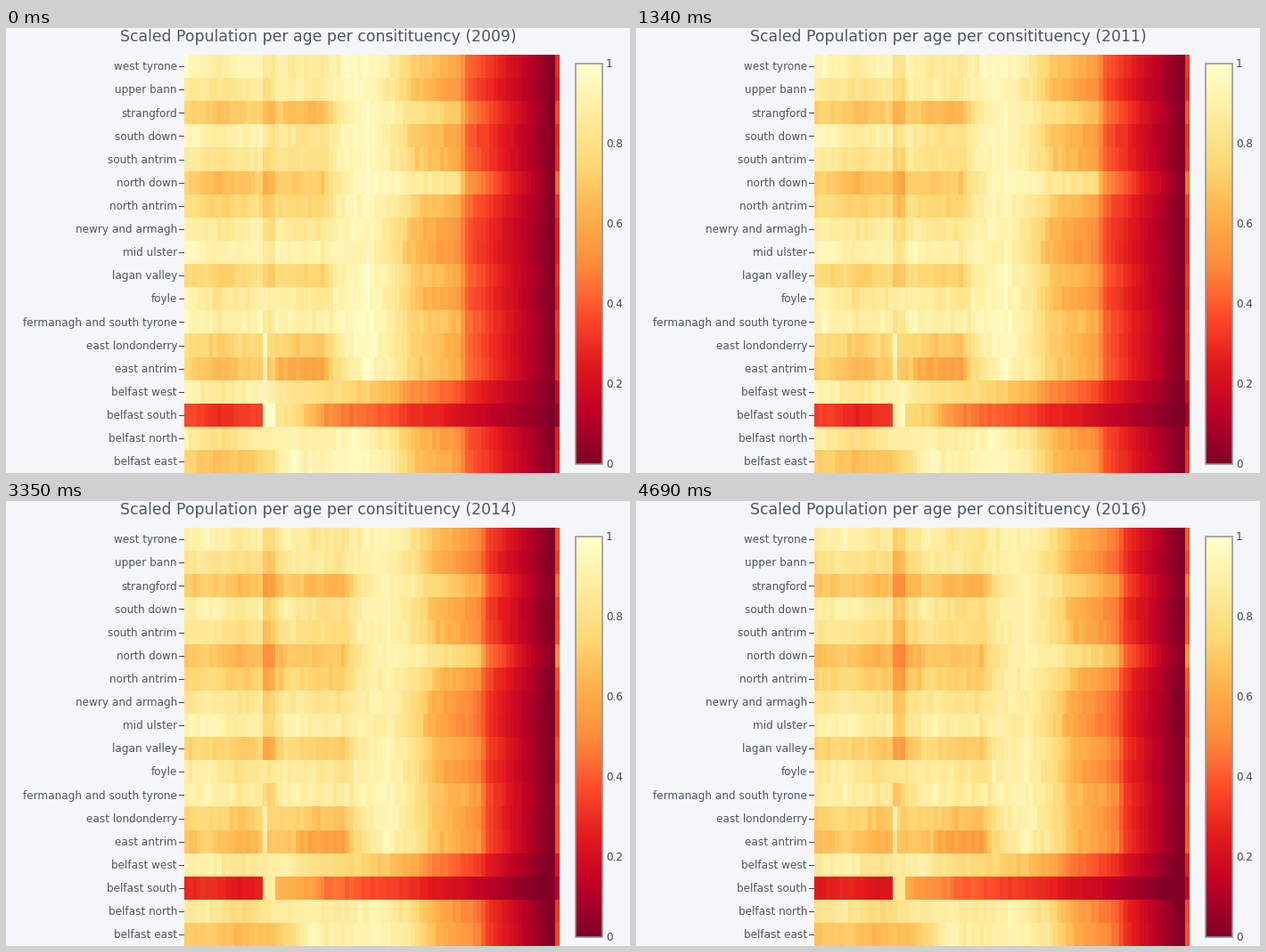
Write a matplotlib script that moves like this. It is 700x500 px and loops after 7370 ms.

```python
import numpy as np
import matplotlib.pyplot as plt
from matplotlib.animation import FuncAnimation
from matplotlib.patches import Rectangle

W, H, DPI = 700, 500, 100
PX = 72 / DPI                       # points per pixel
LEFT, RIGHT, TOP, BOTTOM = 200, 621, 30, 500.2
FIRST_YEAR, LAST_YEAR = 2009, 2016
AGES = np.arange(91)
BACK, INK, DARK = "#f5f6f9", "#4d5663", "#444444"

plt.rcParams["font.family"] = "DejaVu Sans"

# Typical level of the children, young adults and sixty-year-olds.
PLACES = {
    "west tyrone": (.91, .87, .66),
    "upper bann": (.83, .88, .60),
    "strangford": (.70, .66, .76),
    "south down": (.90, .83, .64),
    "south antrim": (.83, .80, .66),
    "north down": (.68, .72, .86),
    "north antrim": (.75, .75, .67),
    "newry and armagh": (.86, .86, .59),
    "mid ulster": (.91, .90, .58),
    "lagan valley": (.74, .74, .66),
    "foyle": (.87, .86, .61),
    "fermanagh and south tyrone": (.90, .91, .69),
    "east londonderry": (.74, .71, .66),
    "east antrim": (.68, .60, .67),
    "belfast west": (.88, .82, .45),
    "belfast south": (.32, .54, .27),
    "belfast north": (.83, .90, .59),
    "belfast east": (.69, .93, .63),
}
STUDENT_CITY = "belfast south"
STUDENT_TOWNS = {"east londonderry", "east antrim"}


def mix(a, b, share):
    return a + (b - a) * share


def cohort_size(age, child, adult, late):
    """Size of a generation by its age in the first year."""
    peak = min(.97, 1.6 * late)
    old = .62 * late + .03
    points = [
        (-7, child), (0, child + .05), (8, child - .03), (18, child + .04),
        (25, adult + .01), (33, adult - .02), (37, mix(adult, peak, .6)),
        (44, peak), (50, mix(peak, late, .3)), (55, mix(peak, late, .78)),
        (61, late), (66, late - .06), (68, old), (89, 0),
    ]
    return np.interp(age, *zip(*points))


def survival(age, years):
    """Share of those now at this age who lived through the last years."""
    def hazard(a):
        return .25 * np.exp(.1 * (a - 70))
    return np.exp(hazard(age - years) - hazard(age))


def student_effect(name, t):
    young = (AGES >= 19) & (AGES <= 21)
    if name == STUDENT_CITY:
        return np.where(young, .6, (AGES > 21) * .03 * np.clip(34 - AGES, 0, 12))
    if name in STUDENT_TOWNS:
        return .2 * (AGES == 19)
    if name == "foyle" or name.startswith("belfast"):
        return 0 * AGES
    moved_on = (AGES > 21) & (AGES - t < 19)
    return -.17 * (.5 + .07 * t) * young - .06 * moved_on


def row_values(index, name, t):
    cohort = AGES - t
    noise = np.random.default_rng(40 + index).normal(0, .022, 98)[cohort + 7]
    fade = 1 - t * (.035 if name == STUDENT_CITY else .005)
    size = cohort_size(cohort, *PLACES[name]) * (1 + noise) * fade
    floor = .12                     # smallest group, scaled to zero
    value = (size + floor) * survival(AGES, t) - floor + student_effect(name, t)
    late = PLACES[name][-1]
    value[89] = 0
    value[90] = .29 + .6 * (late - .65) + .014 * t
    return np.clip(value, 0, 1)


def heat(t):
    return np.array([row_values(i, name, t) for i, name in enumerate(PLACES)])


fig = plt.figure(figsize=(W / DPI, H / DPI), dpi=DPI, facecolor=BACK)
ax = fig.add_axes([0, 0, 1, 1])


def label(x, y, text, size=12, color=INK, ha="left"):
    return ax.text(x, y, text, fontsize=size * PX, color=color, ha=ha,
                   va="baseline")


def show_heat(data, left, right, bottom, top):
    return ax.imshow(data, cmap="YlOrRd_r", vmin=0, vmax=1, aspect="auto",
                     interpolation="nearest", extent=[left, right, bottom, top])


image = show_heat(heat(0), LEFT, RIGHT, BOTTOM, TOP)
title = label(350, 15, "", size=17.25, ha="center")

row_height = (BOTTOM - TOP) / len(PLACES)
for i, name in enumerate(PLACES):
    y = TOP + (i + .5) * row_height
    label(192, y + 4.2, name, ha="right")
    ax.plot([194, 199], [y, y], color=DARK, lw=PX)

show_heat(np.linspace(1, 0, 450)[:, None], 639, 669, 490, 40)
ax.add_patch(Rectangle((639, 40), 30, 450, fill=False, ec="#969696",
                       lw=1.6 * PX))
for i in range(6):
    label(673, 44.2 + 90 * i, f"{1 - i / 5:.1g}", color=DARK)

ax.set(xlim=(0, W), ylim=(H, 0))
ax.axis("off")


def update(frame):
    year = min(FIRST_YEAR + frame, LAST_YEAR)
    image.set_data(heat(year - FIRST_YEAR))
    title.set_text(f"Scaled Population per age per consitituency ({year})")
    return image, title


# The last year holds for three extra steps.
anim = FuncAnimation(fig, update, frames=11, interval=670, repeat=True,
                     repeat_delay=0, init_func=lambda: update(0))
plt.show()
```
